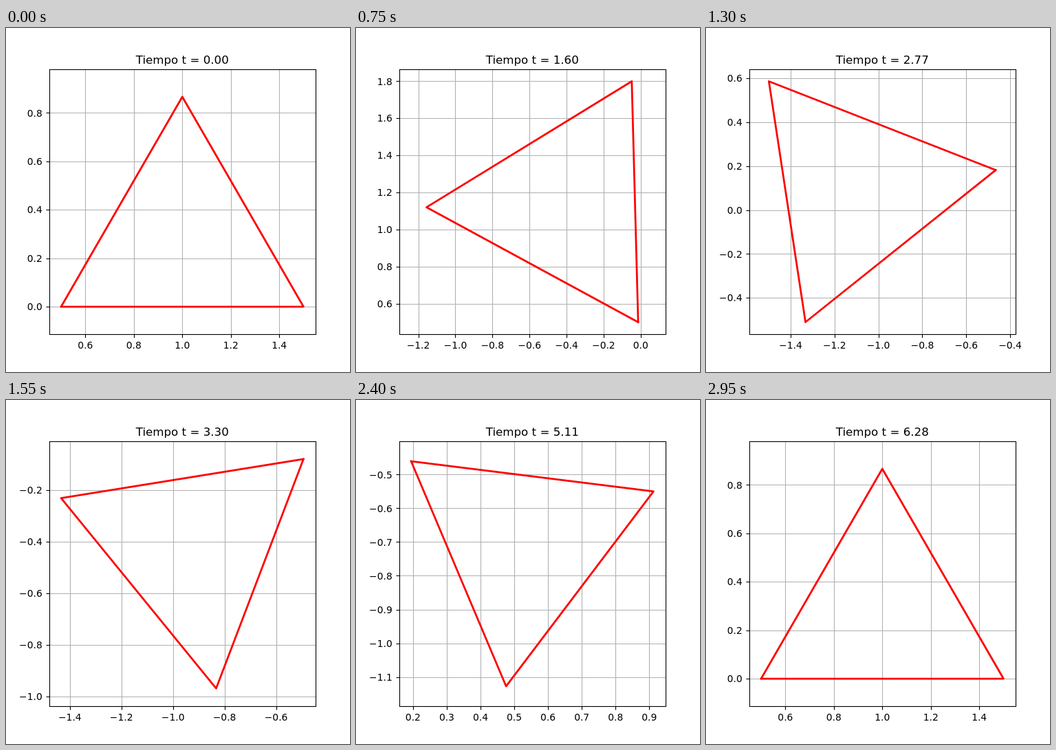
Animation, 500 px wide and 500 px high, one loop 3 s. Source, as an HTML page with a canvas:

```html
<!DOCTYPE html>
<html lang="es">
<head>
<meta charset="utf-8">
<style>
  html, body { margin: 0; width: 100%; height: 100%; overflow: hidden; background: #fff; }
  canvas { display: block; }
</style>
</head>
<body>
<canvas id="stage" width="500" height="500"></canvas>
<script>
const ctx = document.getElementById('stage').getContext('2d');
const LOOP = 3000, STEP = 50, FRAMES = LOOP / STEP;
const LEFT = 62.5, RIGHT = 450, TOP = 60, BOTTOM = 445;
const RATIO = (BOTTOM - TOP) / (RIGHT - LEFT);
const FONT = 'px "DejaVu Sans", Verdana, sans-serif';

const snap = v => Math.floor(v + 0.5) + 0.5;

function line(color, width, points) {
  ctx.strokeStyle = color;
  ctx.lineWidth = width;
  ctx.beginPath();
  points.forEach(p => ctx.lineTo(...p));
  ctx.stroke();
}

function text(string, size, align, x, y) {
  ctx.font = size + FONT;
  ctx.textAlign = align;
  ctx.fillText(string, x, y);
}

// A growing and shrinking triangle, shifted along x and turned about the origin.
function triangle(t) {
  const scale = 1 + 0.3 * Math.sin(t), c = Math.cos(t), s = Math.sin(t);
  return [[0, 0], [1, 0], [0.5, Math.sqrt(3) / 2], [0, 0]].map(([px, py]) => {
    const x = px * scale + 0.5, y = py * scale;
    return [x * c - y * s, x * s + y * c];
  });
}

function extent(values) {
  const min = Math.min(...values), max = Math.max(...values);
  return { mid: (min + max) / 2, data: max - min, size: 1.1 * (max - min) };
}

// Equal aspect: resize one axis range, keeping a small margin round the data.
function fit(points) {
  const x = extent(points.map(p => p[0])), y = extent(points.map(p => p[1]));
  const grow = RATIO * x.size / y.size - 1;
  if (Math.abs(grow) >= 0.005) {
    const wide = y.size / RATIO, tall = RATIO * x.size;
    const adjustY = grow > 0 ? wide < 1.05 * x.data : tall > 1.05 * y.data;
    if (adjustY) y.size = tall;
    else x.size = wide;
  }
  return [x, y];
}

function ticks({ mid, size }) {
  const step = [0.1, 0.2, 0.25, 0.5].find(s => s >= size / 9);
  const list = [];
  for (let i = Math.ceil((mid - size / 2) / step); i * step <= mid + size / 2; i++) list.push(i * step);
  return list;
}

const label = v => (v < -0.01 ? '\u2212' : '') + Math.abs(v).toFixed(1);

function draw(t) {
  const points = triangle(t), [xr, yr] = fit(points);
  const toX = v => (LEFT + RIGHT) / 2 + (v - xr.mid) / xr.size * (RIGHT - LEFT);
  const toY = v => (TOP + BOTTOM) / 2 - (v - yr.mid) / yr.size * (BOTTOM - TOP);
  const l = snap(LEFT), r = snap(RIGHT), top = snap(TOP), b = snap(BOTTOM);

  ctx.fillStyle = '#fff';
  ctx.fillRect(0, 0, 500, 500);
  ctx.fillStyle = '#000';
  ctx.lineCap = 'butt';

  for (const v of ticks(xr)) {
    const x = snap(toX(v));
    line('#b0b0b0', 1.11, [[x, top], [x, b]]);
    line('#000', 1.11, [[x, b], [x, b + 5]]);
    text(label(v), 13.89, 'center', toX(v), 466);
  }
  for (const v of ticks(yr)) {
    const y = snap(toY(v));
    line('#b0b0b0', 1.11, [[l, y], [r, y]]);
    line('#000', 1.11, [[l - 5, y], [l, y]]);
    text(label(v), 13.89, 'right', 52.8, Math.round(toY(v) + 5.3));
  }

  ctx.lineCap = 'square';
  ctx.lineJoin = 'round';
  line('#f00', 2.78, points.map(([x, y]) => [toX(x), toY(y)]));

  ctx.strokeStyle = '#000';
  ctx.lineWidth = 1.11;
  ctx.lineJoin = 'miter';
  ctx.strokeRect(l, top, r - l, b - top);
  text('Tiempo t = ' + t.toFixed(2), 16.67, 'center', 256.25, 52);
}

const start = performance.now();

function tick() {
  const elapsed = Math.max(0, performance.now() - start) % LOOP;
  draw(Math.floor(elapsed / STEP) * 2 * Math.PI / (FRAMES - 1));
  requestAnimationFrame(tick);
}
tick();
</script>
</body>
</html>
```
